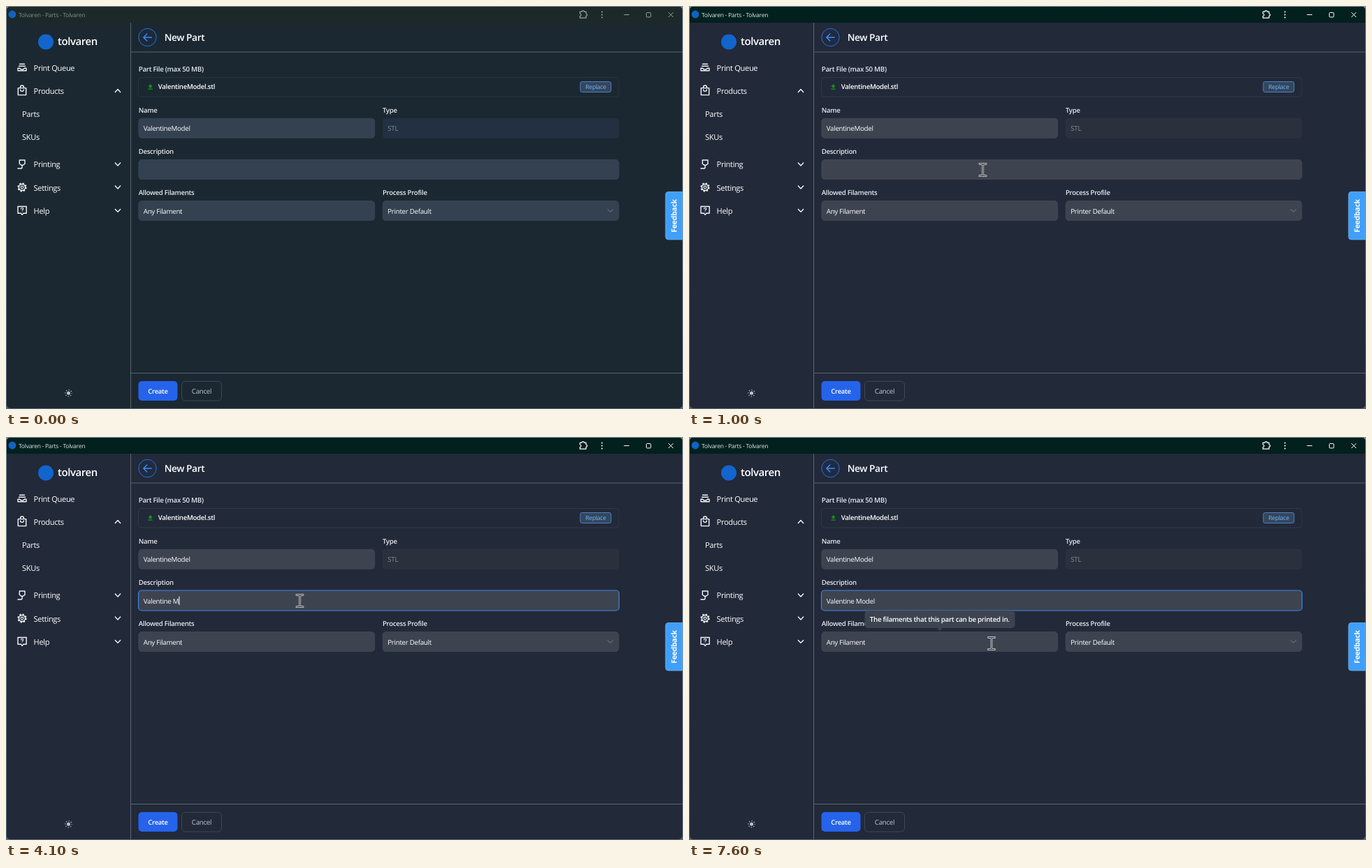
An HTML page for the animation above (8000 ms loop, 969x578 px).

```html
<!DOCTYPE html>
<html lang="en">
<head>
<meta charset="utf-8">
<title>New Part</title>
<style>
@property --bg { syntax: '<color>'; inherits: true; initial-value: #222939; }
@property --field { syntax: '<color>'; inherits: true; initial-value: #3d4450; }
@property --off { syntax: '<color>'; inherits: true; initial-value: #2a313d; }
@property --edge { syntax: '<color>'; inherits: true; initial-value: #444b57; }
@property --bar { syntax: '<color>'; inherits: true; initial-value: #02201e; }
@property --caption { syntax: '<color>'; inherits: true; initial-value: #e4e9ea; }
@property --control { syntax: '<color>'; inherits: true; initial-value: #ffffff; }

html, body { margin: 0; width: 100%; height: 100%; overflow: hidden; background: #222939; }
svg { display: block; width: 969px; height: 578px; animation: palette 8s linear infinite; }
text {
  font-family: 'Open Sans', 'Noto Sans', sans-serif;
  font-size: 9.75px; font-weight: 500; letter-spacing: -.03em; fill: #fff;
  text-rendering: geometricPrecision; white-space: pre;
}
.nav { font-size: 11.1px; }
.label { font-size: 9.65px; font-weight: 600; fill: #e6eaef; }
.bold { font-weight: 600; }
.mid { text-anchor: middle; }
.bg { fill: var(--bg); }
.field { fill: var(--field); stroke: var(--edge); stroke-width: .8; }
.off { fill: var(--off); stroke: var(--field); stroke-opacity: .3; }
.line { fill: none; stroke: #5c6570; }
.icon { fill: none; stroke: #f4f6f8; stroke-width: 1.4; stroke-linecap: round; stroke-linejoin: round; }
.control { fill: none; stroke: var(--control); stroke-width: 1; }

#focus { animation: focus 8s step-end infinite; }
#caret { animation: blink 8s step-end infinite; }
#tip { animation: tip 8s step-end infinite; }
#click { animation: click 8s step-end infinite; }
#pointer { animation: point 8s step-end infinite; }

@keyframes palette {
  0%, 1.2% { --bg: #1b2831; --field: #334151; --off: #223041; --edge: #3a4858; --bar: #1c2928; --caption: #858d8e; --control: #9aa1a2; }
  6.25% { --bg: #222a31; --field: #3d4350; --off: #2a3041; --edge: #444a57; --bar: #222c36; }
  12.49% { --bar: #222b36; --caption: #858d8e; --control: #9aa1a2; }
  12.5%, 100% { --bg: #222939; --field: #3d4450; --off: #2a313d; --edge: #444b57; --bar: #02201e; --caption: #e4e9ea; --control: #fff; }
}
@keyframes focus { 0% { opacity: 0; } 13.75%, 100% { opacity: 1; } }
@keyframes blink {
  0% { opacity: 0; } 13.75% { opacity: 1; }
  20% { opacity: 0; } 25% { opacity: 1; }
  68.75% { opacity: 0; } 75% { opacity: 1; }
  81.25% { opacity: 0; } 87.5% { opacity: 1; }
  95%, 100% { opacity: 0; }
}
@keyframes tip {
  0% { opacity: 0; } 5% { opacity: .6; } 6.25% { opacity: 1; }
  8.75% { opacity: .6; } 10% { opacity: 0; }
  86.25% { opacity: .3; } 87.5% { opacity: .8; } 88.75%, 100% { opacity: 1; }
}
@keyframes click {
  0% { opacity: 0; } 13.75% { opacity: .7; } 15% { opacity: 1; }
  17.5% { opacity: .75; } 18.75% { opacity: .35; } 20%, 100% { opacity: 0; }
}
@keyframes point {
  0% { transform: translate(372px, 620px); }
  1.25% { transform: translate(372px, 470px); }
  2.5% { transform: translate(392px, 380px); }
  3.75% { transform: translate(404px, 325px); }
  5% { transform: translate(409px, 306px); }
  6.25% { transform: translate(411.5px, 301.5px); }
  7.5% { transform: translate(412px, 296px); }
  8.75% { transform: translate(414px, 280px); }
  10% { transform: translate(417px, 258px); }
  11.25% { transform: translate(419px, 240px); }
  12.5% { transform: translate(420.5px, 235px); }
  81.25% { transform: translate(420.5px, 236px); }
  82.5% { transform: translate(421px, 240px); }
  83.75% { transform: translate(423px, 251px); }
  85% { transform: translate(426px, 266px); }
  86.25% { transform: translate(429px, 280px); }
  87.5% { transform: translate(431px, 290px); }
  88.75% { transform: translate(432.5px, 295px); }
  90%, 100% { transform: translate(433px, 296px); }
}
</style>
</head>
<body>
<svg viewBox="0 0 969 578" xmlns="http://www.w3.org/2000/svg">
  <defs>
    <path id="down" d="M-3.7-1.9 0 1.9 3.7-1.9"/>
    <path id="beam" d="M-4.2-8.6H-1.6Q0-8.6 0-7Q0-8.6 1.6-8.6H4.2M0-7V7M-4.2 8.6H-1.6Q0 8.6 0 7Q0 8.6 1.6 8.6H4.2"/>
    <linearGradient id="desk" x2="0" y2="1">
      <stop stop-color="#84919e"/>
      <stop offset="1" stop-color="#5c6676"/>
    </linearGradient>
  </defs>

  <!-- window -->
  <rect width="969" height="578" fill="url(#desk)"/>
  <rect class="bg" x="1" y="1" width="967" height="576" rx="5"/>
  <path d="M1 24V6Q1 1 6 1H963Q968 1 968 6V24Z" fill="var(--bar)"/>
  <circle cx="9" cy="12" r="5.4" fill="#1262c4"/>
  <text x="18" y="15.8" style="font-size:8.5px;font-weight:400;fill:var(--caption)">Tolvaren - Parts - Tolvaren</text>
  <g class="control">
    <path stroke-width="1.2" stroke-linejoin="round" d="M821.5 8.2H824.3Q824.3 6.6 825.9 6.6T827.5 8.2H830.2V11Q831.8 11 831.8 12.6T830.2 14.2V17.2H821.5V14.4Q823.2 14.2 823.2 12.7T821.5 11Z"/>
    <path stroke-width="2" stroke-linecap="round" d="M853 8.6V8.6M853 12.5V12.5M853 16.4V16.4"/>
    <path d="M884.5 12.5H892"/>
    <rect x="916.5" y="9.5" width="6.4" height="6.4" rx="1"/>
    <path d="M948.2 9.2 955 16M955 9.2 948.2 16"/>
  </g>

  <!-- sidebar -->
  <circle cx="57" cy="51.5" r="11" fill="#1265cc"/>
  <text class="bold" x="74" y="56" style="font-size:15px">tolvaren</text>
  <g class="icon">
    <path d="M19.5 83.3H26.5M18.5 86.2H27.5M17 89.3H19.8Q20.3 91 23 91T26.2 89.3H29V92.8H17Z"/>
    <path d="M17.3 117.6H28.7V127.6H17.3ZM20.5 117.4V116.4Q20.5 114 23 114T25.5 116.4V117.4M20.5 120Q20.8 122.4 23 122.4T25.5 120"/>
    <path d="M19.3 221H27V226.3L24.5 228.3H21.8L19.3 226.3ZM23.1 228.5V231.2Q23.1 233 21.2 233H17"/>
    <circle cx="23" cy="260" r="4.5" stroke-width="1.4"/>
    <circle cx="23" cy="260" r="5.7" stroke-width="1.9" stroke-linecap="butt" stroke-dasharray="2.24 2.24"/>
    <circle cx="23" cy="260" r="1.8" stroke-width="1.2"/>
    <path d="M17 287.5H29.2V297.3H25L23.1 299.4 21.2 297.3H17Z"/>
    <path stroke-width="1.2" d="M21.5 290.9Q21.6 289.5 23.1 289.5T24.7 291Q24.7 291.8 23.1 292.9M23.1 295V295"/>
    <use href="#down" transform="translate(160 121.5) scale(1 -1)"/>
    <use href="#down" x="160" y="227"/>
    <use href="#down" x="160" y="260"/>
    <use href="#down" x="160" y="293.3"/>
  </g>
  <text class="nav" x="39.6" y="92.6">Print Queue</text>
  <text class="nav" x="39.6" y="125.8">Products</text>
  <text class="nav" x="23" y="159">Parts</text>
  <text class="nav" x="23" y="192.3">SKUs</text>
  <text class="nav" x="39.6" y="231.3">Printing</text>
  <text class="nav" x="39.6" y="264.6">Settings</text>
  <text class="nav" x="39.6" y="297.8">Help</text>
  <circle cx="89.5" cy="555.3" r="2.5" fill="#bcc3c9"/>
  <circle cx="89.5" cy="555.3" r="4.6" fill="none" stroke="#bcc3c9" stroke-width="1.4" stroke-dasharray="1.2 2.413" stroke-dashoffset=".6"/>

  <path class="line" d="M178.5 24V577M178.5 66H968M178.5 526.5H968"/>

  <!-- header -->
  <circle cx="202.5" cy="45" r="12.7" fill="#1d3a6b" fill-opacity=".18" stroke="#2a72d8"/>
  <path class="icon" d="M208.2 45H197M201.8 40 196.8 45 201.8 50" style="stroke:#3f8cf5"/>
  <text class="bold" x="226.7" y="50.2" style="font-size:13.7px">New Part</text>

  <!-- form -->
  <text class="label" x="189.7" y="94" style="font-size:9.75px">Part File (max 50 MB)</text>
  <rect x="189.5" y="102.5" width="687.5" height="27.5" rx="4" fill="none" stroke="var(--field)" stroke-opacity=".55"/>
  <path d="M206.6 112 210 115.6H208V117.6H205.2V115.6H203.2ZM203.4 118.4H209.8V119.8H203.4Z" fill="#179018"/>
  <text class="bold" x="217.7" y="119.4" style="font-size:9.65px">ValentineModel.stl</text>
  <rect x="822" y="108.5" width="44" height="15" rx="2.5" fill="#34465c" stroke="#4b82c4"/>
  <text class="mid" x="844" y="119.3" style="font-size:8.6px;fill:#72b6ff">Replace</text>

  <text class="label" x="189.7" y="152.6">Name</text>
  <text class="label" x="538.9" y="152.6">Type</text>
  <text class="label" x="189.7" y="211.8">Description</text>
  <text class="label" x="189.7" y="271">Allowed Filaments</text>
  <text class="label" x="538.9" y="271">Process Profile</text>

  <rect class="field" x="189.9" y="161.3" width="337.8" height="28" rx="4.5"/>
  <rect class="off" x="539.2" y="161.3" width="337.8" height="28" rx="4.5"/>
  <rect class="field" x="189.9" y="220.5" width="687.2" height="28" rx="4.5"/>
  <rect class="field" x="189.9" y="279.6" width="337.8" height="28" rx="4.5"/>
  <rect class="field" x="539.2" y="279.6" width="337.8" height="28" rx="4.5"/>
  <text x="196.8" y="179.4">ValentineModel</text>
  <text x="546.3" y="179.4" style="fill:#838b96">STL</text>
  <text x="196.8" y="297.8">Any Filament</text>
  <text x="546.3" y="297.8">Printer Default</text>
  <use href="#down" class="icon" x="865" y="293.6" style="stroke:#7f8893;stroke-width:1"/>

  <rect id="focus" x="189.5" y="220" width="688" height="29" rx="4.5" fill="none" stroke="#3f84ee" stroke-width="1.2"/>
  <text id="typed" x="196.8" y="238.7"></text>
  <rect id="caret" x="197" y="228.5" width="1" height="12.5" fill="#fff"/>

  <!-- footer -->
  <rect x="189.5" y="538" width="56" height="28" rx="5" fill="#2563eb"/>
  <text class="bold mid" x="217.5" y="556.3" style="font-size:9.5px">Create</text>
  <rect x="251.5" y="538.3" width="57" height="27.8" rx="5" fill="none" stroke="#3e4858"/>
  <text class="mid" x="280" y="556.3" style="fill:#c0c6ce">Cancel</text>

  <path d="M968 266.5H948Q944 266.5 944 270.5V331Q944 335 948 335H968Z" fill="#409ff8" stroke="#6bb6fb" stroke-width=".8"/>
  <text class="mid" transform="translate(960.2 301) rotate(-90)" style="font-size:10.6px;font-weight:700">Feedback</text>

  <!-- overlays -->
  <g id="tip">
    <path d="M256.5 249H461.5Q466.5 249 466.5 254V269Q466.5 274 461.5 274H363L359 278 355 274H256.5Q251.5 274 251.5 269V254Q251.5 249 256.5 249Z" fill="var(--field)"/>
    <text class="bold mid" x="358.8" y="265.4" style="font-size:9.78px">The filaments that this part can be printed in.</text>
  </g>
  <circle id="click" cx="420" cy="235" r="28.8" fill="#e6914a" fill-opacity=".38"/>
  <g id="pointer" fill="none" stroke-linecap="square">
    <use href="#beam" stroke="#20242c" stroke-width="3.8" stroke-opacity=".3"/>
    <use href="#beam" stroke="#fff" stroke-width="2.6"/>
    <use href="#beam" stroke="#20242c" stroke-width="1.1"/>
  </g>
</svg>
<script>
const LOOP = 8000;
const PHRASE = 'Valentine Model';
const KEYS = [2000, 2200, 2300, 2400, 2500, 3000, 3300, 3400, 3600, 3800, 4100, 4400, 4600, 4700, 4900];
const typed = document.getElementById('typed');
const caret = document.getElementById('caret');
let start;
let shown = -1;

function draw(now) {
  start ??= now;
  const t = (now - start) % LOOP;
  const count = KEYS.filter(key => key <= t).length;
  if (count !== shown) {
    shown = count;
    typed.textContent = PHRASE.slice(0, count);
    const width = count ? typed.getComputedTextLength() : 0;
    caret.setAttribute('x', 197 + width);
  }
  requestAnimationFrame(draw);
}
requestAnimationFrame(draw);
</script>
</body>
</html>
```
